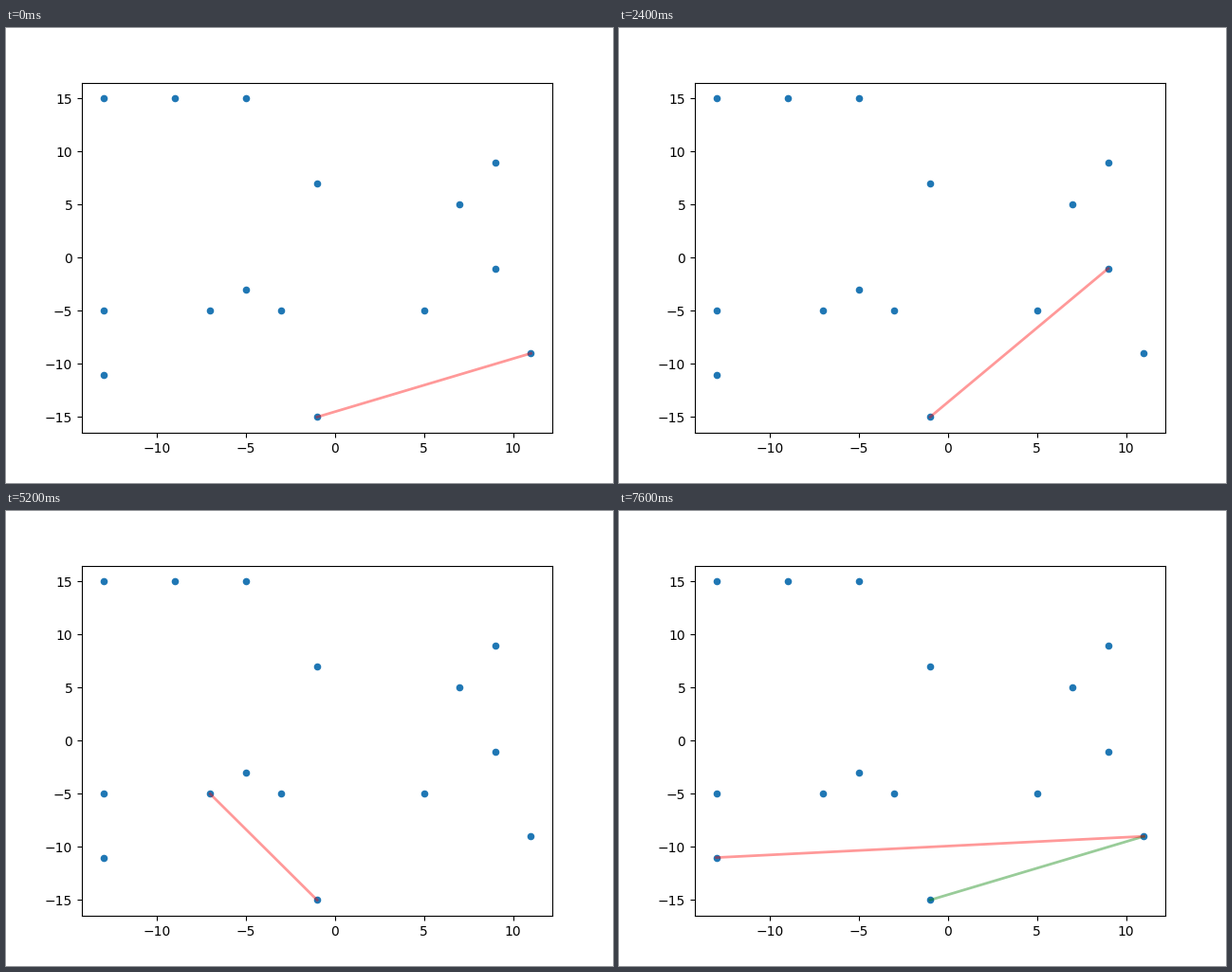
These frames come from a looping animation (640 by 480 pixels, 8000 ms). A matplotlib script:

```python
from itertools import islice

import matplotlib.pyplot as plt
from matplotlib.animation import FuncAnimation

POINTS = [(11, -9), (-5, -3), (-3, -5), (-1, -15), (-13, -11),
          (-1, 7), (9, -1), (-13, -5), (-9, 15), (9, 9),
          (-5, 15), (5, -5), (7, 5), (-7, -5), (-13, 15)]
FRAMES = 20
INTERVAL = 400


def turn(a, b, c):
    """Cross product, negative when c lies to the right of the ray a-b."""
    return (b[0] - a[0]) * (c[1] - a[1]) - (b[1] - a[1]) * (c[0] - a[0])


def next_corner(corner):
    best = corner
    for point in POINTS:
        if best == corner or turn(corner, best, point) < 0:
            best = point
    return best


def gift_wrap():
    """Yield the hull so far and the point being tested against its end."""
    hull = [min(POINTS, key=lambda point: point[1])]
    while True:
        for point in POINTS:
            yield list(hull), point
        hull.append(next_corner(hull[-1]))


steps = list(islice(gift_wrap(), FRAMES))

fig, ax = plt.subplots(figsize=(6.4, 4.8), dpi=100)
ax.scatter(*zip(*POINTS), s=20)
style = dict(alpha=0.4, linewidth=2)
hull_line, = ax.plot([], [], color="g", **style)
probe_line, = ax.plot([], [], color="r", **style)


def update(frame):
    hull, point = steps[frame]
    hull_line.set_data(*zip(*hull))
    hull_line.set_visible(len(hull) > 1)
    probe_line.set_data(*zip(hull[-1], point))
    return hull_line, probe_line


animation = FuncAnimation(fig, update, frames=FRAMES, interval=INTERVAL,
                          init_func=lambda: update(0),
                          repeat=True, repeat_delay=0)
plt.show()
```
